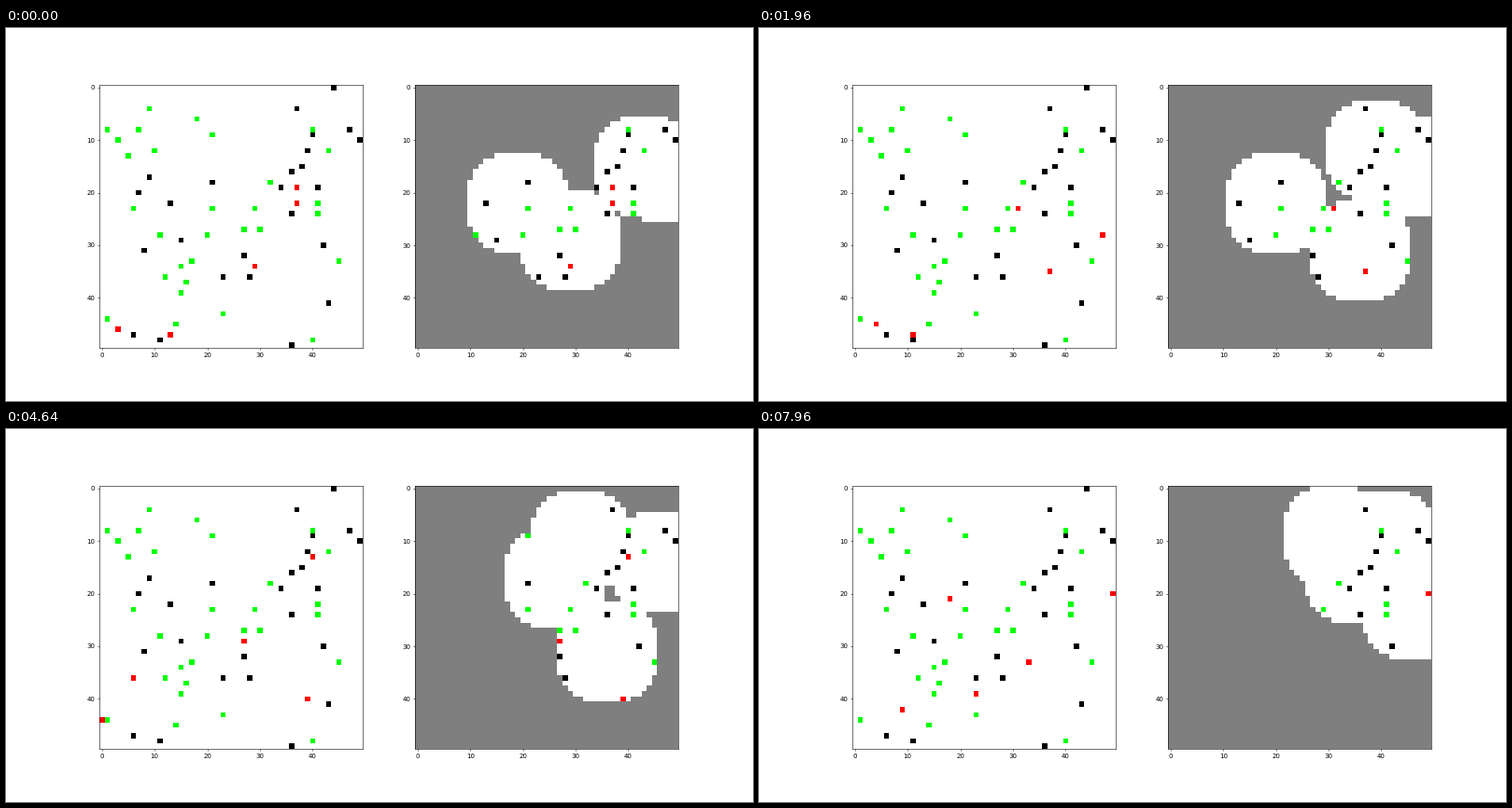
These frames come from a looping animation (800x400 px, 8000 ms). A matplotlib script:

```python
import random

import matplotlib.pyplot as plt
import numpy as np
from matplotlib.animation import FuncAnimation

SIZE = 50
FRAMES = 200
REACH = 9
WHITE, BLACK, GREY = (255, 255, 255), (0, 0, 0), (127, 127, 127)
RED, GREEN = (255, 0, 0), (0, 255, 0)

# the fixed map; all cells are (column, row)
WALLS = [(44, 0), (37, 4), (47, 8), (40, 9), (49, 10), (39, 12), (38, 15),
         (36, 16), (9, 17), (21, 18), (34, 19), (41, 19), (7, 20), (13, 22),
         (36, 24), (15, 29), (42, 30), (8, 31), (27, 32), (23, 36), (28, 36),
         (43, 41), (6, 47), (11, 48), (36, 49)]
PLANTS = [(9, 4), (18, 6), (1, 8), (7, 8), (40, 8), (21, 9), (3, 10),
          (10, 12), (43, 12), (5, 13), (32, 18), (41, 22), (6, 23), (21, 23),
          (29, 23), (41, 24), (27, 27), (30, 27), (11, 28), (20, 28),
          (17, 33), (45, 33), (15, 34), (12, 36), (16, 37), (15, 39),
          (23, 43), (1, 44), (14, 45), (40, 48)]

# each walker rambles between a few waypoints, reached at these frames
STOPS = [0, 49, 140, FRAMES - 1]
TARGETS = [
    [(3, 46), (4, 45), (0, 43), (9, 42)],
    [(13, 47), (11, 47), (1, 32), (23, 39)],
    [(37, 19), (47, 28), (37, 43), (33, 33)],
    [(37, 22), (31, 23), (46, 13), (49, 20)],
    [(29, 34), (37, 35), (22, 28), (18, 21)],
]
SCOUTS = [
    [(19, 22), (20, 22), (27, 16), (31, 9)],
    [(43, 15), (39, 12), (28, 10), (35, 16)],
    [(29, 29), (36, 31), (35, 31), (46, 23)],
    [(47, 16), (47, 15), (45, 9), (41, 10)],
]

rng = random.Random(7)


def ramble(start, end, n):
    """n shuffled steps of -1, 0 or 1 from start to end, with back-and-forth."""
    gap = end - start
    spare = n - abs(gap)
    moves = [[1 if gap > 0 else -1]] * abs(gap)
    for _ in range(spare // 3):
        side = rng.choice([-1, 1])
        moves.append([side, -side])
    moves += [[0]] * (spare - 2 * (spare // 3))
    rng.shuffle(moves)
    return start + np.cumsum(sum(moves, []))


def walk(points):
    axes_tracks = []
    for values in zip(*points):
        track = [values[0]]
        for k, n in enumerate(np.diff(STOPS)):
            track.extend(ramble(values[k], values[k + 1], int(n)))
        axes_tracks.append(np.clip(track, 0, SIZE - 1))
    return np.column_stack(axes_tracks)


target_paths = [walk(p) for p in TARGETS]
scout_paths = [walk(p) for p in SCOUTS]

rows, cols = np.mgrid[:SIZE, :SIZE]
ground = np.full((SIZE, SIZE, 3), WHITE, dtype=np.uint8)
for cells, color in ((WALLS, BLACK), (PLANTS, GREEN)):
    for x, y in cells:
        ground[y, x] = color


def views(i):
    world = ground.copy()
    for path in target_paths:
        x, y = path[i]
        world[y, x] = RED
    seen = np.zeros((SIZE, SIZE), dtype=bool)
    for path in scout_paths:
        x, y = path[i]
        dx, dy = abs(cols - x), abs(rows - y)
        near = dx * dx + dy * dy <= (REACH + 1) ** 2
        seen |= near & (np.maximum(dx, dy) <= REACH)
    known = world.copy()
    known[~seen] = GREY
    return world, known


fig, axes = plt.subplots(1, 2, figsize=(16, 8), dpi=50)
images = [ax.imshow(v) for ax, v in zip(axes, views(0))]


def update(i):
    for image, view in zip(images, views(i)):
        image.set_data(view)
    return images


anim = FuncAnimation(fig, update, frames=FRAMES, interval=40,
                     repeat=True, repeat_delay=0)
plt.show()
```
